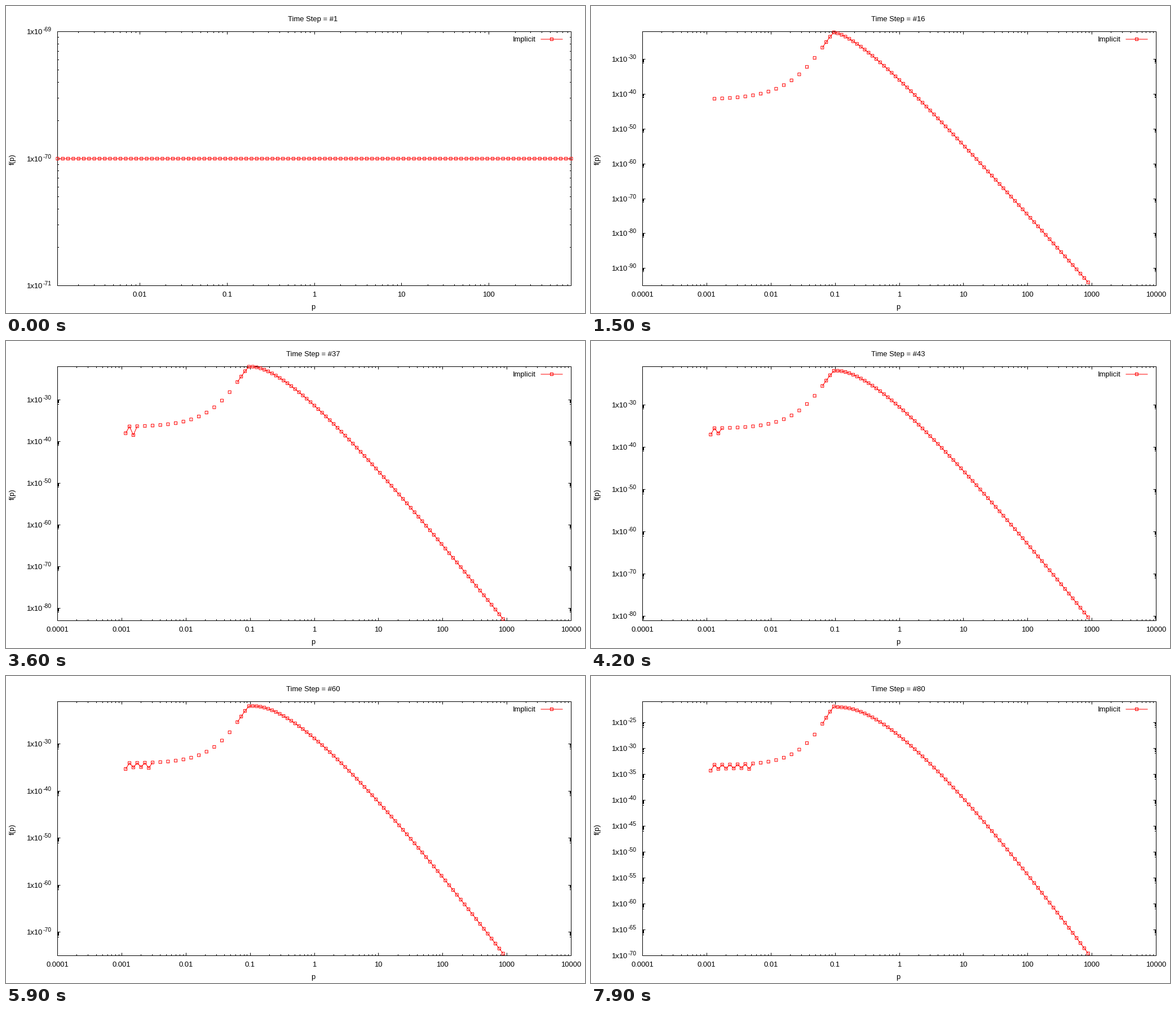
A matplotlib script for the animation above (8000 ms loop, 1027 by 545 pixels).

```python
import math

import numpy as np
import matplotlib.pyplot as plt
from matplotlib.animation import FuncAnimation

W, H, DPI = 1027, 545, 64
PX = 72 / DPI                   # one pixel in points
STEPS = 80
TOP, BOTTOM, RIGHT = 45.5, 496.5, 1002.5
RED = "#ff0000"
PEAK = 33                       # cell that receives the injection
CELLS = np.arange(1, 100)
LOG_P = -3 + 0.06 * CELLS


def log_binomial(n, k):
    return (math.lgamma(n + 1) - math.lgamma(k + 1) - math.lgamma(n - k + 1)) / math.log(10)


def peak_value(n):
    """Injection builds up and saturates against losses."""
    return -21.94 + math.log10(1 - math.exp(-n / 20))


def tail(n, k):
    """Drop k cells above the peak: binomial spreading, cost per cell, losses."""
    spread = log_binomial(n + k, k + 1) - math.log10(n)
    cost = 1.333 * k - 1.4 * (1 - math.exp(-k / 9))
    loss = 1.75 * (n / STEPS) ** 2.2 * k / (k + 2.4)
    return spread - cost - loss


def shoulder(n, d):
    """Drop d cells below the peak, levelling off to a slowly rising plateau."""
    depth = 10.5 + 16.3 * math.exp(-n / 26)
    width = 6.3 + 3.9 * math.exp(-n / 50)
    return -depth * (1 - math.exp(-(d / width) ** 1.22))


def log_f(n, cell):
    """log10 f of one cell; NaN where f is negative."""
    if cell >= PEAK:
        return peak_value(n) + tail(n, cell - PEAK)
    y = peak_value(n) + shoulder(n, PEAK - cell)
    if cell % 2 and cell < 30:
        # odd cells turn positive one after another, from the left
        age = n - (21 + 5 * cell)
        if age < 0:
            return math.nan
        y -= 0.35 + 33 / n + 1.2 * math.exp(-age / 2.5) + math.exp(-cell)
    return y


def solution(n):
    if n == 1:
        return np.full(len(CELLS), -70.0)
    return np.array([log_f(n, c) for c in CELLS])


fig = plt.figure(figsize=(W / DPI, H / DPI), dpi=DPI, facecolor="white")
ax = fig.add_axes([0, 0, 1, 1])


def label(x, y, text, ha="center", px=13, **kw):
    ax.text(x, y, text, ha=ha, va=kw.pop("va", "baseline"), color="black",
            family="Liberation Sans", fontsize=px * PX, **kw)


def stroke(x, y, color="black", **kw):
    ax.plot(x, y, color=color, lw=PX, snap=False, **kw)


def squares(x, y):
    """Open squares with a dot in the middle."""
    dx = np.array([-2.5, 2.5, 2.5, -2.5, -2.5, np.nan])
    dy = np.array([-2.5, -2.5, 2.5, 2.5, -2.5, np.nan])
    stroke(np.add.outer(x, dx).ravel(), np.add.outer(y, dy).ravel(), RED,
           solid_joinstyle="miter", solid_capstyle="butt")
    ax.plot(x, y, ls="none", marker="o", ms=PX, mfc=RED, mec="none")


def pixel(v):
    return math.floor(v) + 0.5


def tick_list(lo, hi, step):
    """Pairs of (exponent, length); small ticks fill the decade below each major."""
    ticks = []
    for major in range(math.floor(lo / step) * step, math.ceil(hi) + step + 1, step):
        ticks += [(major - 1 + math.log10(k), 2.5) for k in range(2 if step == 1 else 1, 10)]
        ticks.append((major, 5))
    return [t for t in ticks if lo - 1e-9 <= t[0] <= hi + 1e-9]


def draw(frame):
    n = frame + 1
    ys = solution(n)
    ax.clear()
    ax.set_axis_off()
    ax.set_xlim(0, W)
    ax.set_ylim(H, 0)

    if n == 1:
        x_lo, x_hi, y_lo, y_hi = LOG_P[0], LOG_P[-1], -71, -69
    else:
        x_lo, x_hi = -4, 4
        y_lo, y_hi = math.floor(np.nanmin(ys)), math.ceil(np.nanmax(ys))
    left = 99.5 if y_lo <= -100 else 91.5
    span = y_hi - y_lo
    step = 1 if span < 10 else 5 if span <= 50 else 10

    def to_x(v):
        return left + (v - x_lo) / (x_hi - x_lo) * (RIGHT - left)

    def to_y(v):
        return BOTTOM - (v - y_lo) / span * (BOTTOM - TOP)

    stroke([left, RIGHT, RIGHT, left, left], [TOP, TOP, BOTTOM, BOTTOM, TOP])

    xs, xt = [], []
    for v, size in tick_list(x_lo, x_hi, 1):
        x = pixel(to_x(v))
        xs += [x, x, np.nan] * 2
        xt += [BOTTOM, BOTTOM - size, np.nan, TOP, TOP + size, np.nan]
        if size == 5:
            label(x - 0.5, 516, f"{10.0 ** v:g}")
    stroke(xs, xt, solid_capstyle="butt")

    yt, yp = [], []
    for v, size in tick_list(y_lo, y_hi, step):
        y = pixel(to_y(v))
        yp += [y, y, np.nan] * 2
        yt += [left, left + size, np.nan, RIGHT, RIGHT - size, np.nan]
        if size == 5:
            end = left - 10.5
            label(end, y - 0.5, str(v), ha="right", px=10.4)
            label(end - 17 - 6 * (v <= -100), y + 4.5, "1x10", ha="right")
    stroke(yt, yp, solid_capstyle="butt")

    middle = (left + RIGHT) / 2 - 2.5
    label(middle, 27, f"Time Step = #{n}")
    label(middle, 538, "p")
    label(11.5, 272, "f(p)", va="center", rotation=90)

    label(939, 63, "Implicit", ha="right")
    stroke([949, 987], [59, 59], RED)
    squares([968], [59])

    px, py = to_x(LOG_P), to_y(ys)
    stroke(px, py, RED, solid_joinstyle="round", solid_capstyle="butt")
    squares(px, py)
    return []


anim = FuncAnimation(fig, draw, frames=STEPS, interval=100, init_func=lambda: [],
                     repeat=True, repeat_delay=0, blit=False)
plt.show()
```
